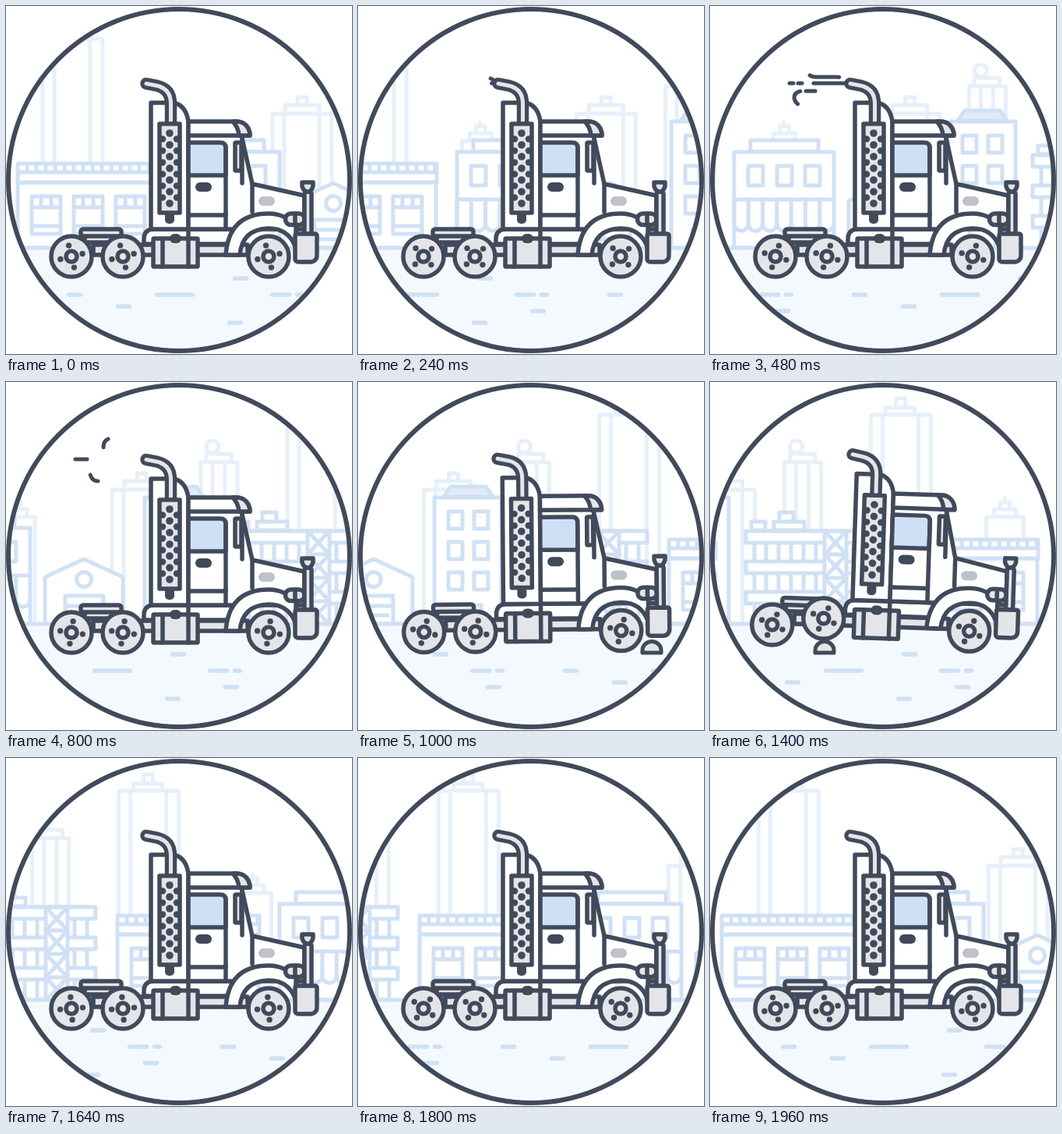
Recreate the animation shown at these times as an HTML page with a canvas. Size 444 by 446 pixels, loop 2 s.

```html
<!DOCTYPE html>
<html lang="en">
<head>
<meta charset="utf-8">
<title>Truck on the road</title>
<style>
html, body { margin: 0; width: 100%; height: 100%; overflow: hidden; background: #fff; }
canvas { display: block; width: 444px; height: 446px; }
</style>
</head>
<body>
<canvas id="stage" width="444" height="446"></canvas>
<script>
const c = document.getElementById('stage').getContext('2d');
const INK = '#414a5b', GRAY = '#e4e5e9', GLASS = '#cee0f5', MID = '#d0e1f5', FAR = '#e7f0fa', GROUND = '#f4f9fd';
const TAU = Math.PI * 2, STEP = 40, FRAMES = 50;

function pen(color, width) {
  c.strokeStyle = color;
  c.lineWidth = width;
  c.lineCap = c.lineJoin = 'round';
}
function shape(d, fill) {
  const p = new Path2D(d);
  if (fill) { c.fillStyle = fill; c.fill(p); }
  c.stroke(p);
}
function box(x1, y1, x2, y2, fill, r = 0) {
  c.beginPath();
  c.roundRect(x1, y1, x2 - x1, y2 - y1, r);
  if (fill) { c.fillStyle = fill; c.fill(); }
  c.stroke();
}
function solid(x1, y1, x2, y2, color, r = 0) {
  c.fillStyle = color;
  c.beginPath();
  c.roundRect(x1, y1, x2 - x1, y2 - y1, r);
  c.fill();
}
function line(x1, y1, x2, y2) {
  c.beginPath();
  c.moveTo(x1, y1);
  c.lineTo(x2, y2);
  c.stroke();
}
function disc(x, y, r, fill, edge) {
  c.beginPath();
  c.arc(x, y, r, 0, TAU);
  if (fill) { c.fillStyle = fill; c.fill(); }
  if (edge) c.stroke();
}
function at(x, draw) {
  c.save();
  c.translate(x, 0);
  draw();
  c.restore();
}
// Piecewise curve through [time, value] points
function curve(t, pts, smooth) {
  if (t <= pts[0][0]) return pts[0][1];
  for (let i = 1; i < pts.length; i++) {
    const [t0, a] = pts[i - 1], [t1, b] = pts[i];
    if (t <= t1) {
      let k = (t - t0) / (t1 - t0);
      if (smooth) k = k * k * (3 - 2 * k);
      return a + (b - a) * k;
    }
  }
  return pts[pts.length - 1][1];
}

// Distant skyline
function farCity() {
  pen(FAR, 5);
  box(79, 21, 91, 33, '#fff');
  box(66, 33, 103, 42, '#fff');
  box(47, 42, 124, 310, '#fff');
  line(62, 42, 62, 310);
  line(108, 42, 108, 310);

  line(219, 149, 219, 154);
  box(213, 154, 225, 164, '#fff');
  box(205, 163, 233, 173, '#fff');
  box(195, 173, 243, 310, '#fff');

  box(374, 117, 386, 127, '#fff');
  box(358, 127, 402, 138, '#fff');
  box(342, 138, 418, 310, '#fff');
  line(357, 138, 357, 310);
  line(402, 138, 402, 310);

  disc(471, 83, 8, '#fff', true);
  box(463, 92, 495, 103, '#fff');
  box(456, 103, 503, 310, '#fff');
  line(471, 103, 471, 310);
  line(487, 103, 487, 310);
}

function warehouse() {
  box(15, 226, 196, 310, '#fff');
  box(15, 202, 197, 226, '#fff');
  line(15, 213, 197, 213);
  for (let x = 27; x < 196; x += 12) line(x, 204, x, 211);
  for (const x of [33, 87, 141]) {
    box(x, 244, x + 37, 292);
    line(x, 258, x + 37, 258);
    line(x + 12, 244, x + 12, 258);
    line(x + 25, 244, x + 25, 258);
    line(x, 282, x + 37, 282);
  }
}
function store() {
  box(244, 172, 331, 187, '#fff');
  box(223, 187, 351, 310, '#fff');
  for (const x of [241, 278, 314]) box(x, 205, x + 19, 230);
  line(223, 248, 351, 248);
  const w = 128 / 7;
  for (let i = 0; i < 7; i++) {
    const x = 223 + i * w;
    line(x, 248, x, 280);
    c.beginPath();
    c.arc(x + w / 2, 279, w / 2, Math.PI, 0, true);
    c.stroke();
  }
}
function house() {
  shape('M370 310V250L420 227L470 250V310Z', '#fff');
  disc(420, 253, 9.5, '#fff', true);
  box(396, 274, 445, 310);
  line(396, 287, 445, 287);
  line(402, 299, 438, 299);
}
function flats() {
  shape('M510 147L519 134H564L573 147Z', '#e1ebf7');
  box(498, 148, 584, 310, '#fff');
  for (let y = 166; y < 260; y += 39)
    for (const x of [516, 549]) box(x, y, x + 18, y + 22);
  box(525, 286, 558, 310);
}
function terrace() {
  box(613, 179, 631, 190, '#fff');
  box(642, 179, 681, 190, '#fff');
  box(649, 167, 667, 179, '#fff');
  box(617, 191, 760, 310, '#fff');
  for (let x = 632; x < 760; x += 16) line(x, 191, x, 310);
  for (let y = 191; y < 290; y += 39) box(606, y, 771, y + 15, '#fff');
  box(707, 191, 735, 310, '#fff');
  for (let y = 191; y < 300; y += 30) {
    line(707, y, 735, y);
    line(707, y, 735, y + 30);
    line(735, y, 707, y + 30);
  }
}
function midCity() {
  pen(MID, 5);
  warehouse();
  store();
  house();
  flats();
  terrace();
}

// Offsets are relative to the long dash
const DASHES = [
  [0, 46, 370], [100, 15, 349], [148, 22, 370], [180, 7, 370],
  [267, 15, 370], [-50, 15, 385], [168, 15, 391], [93, 15, 406]
];
function road(n) {
  pen(MID, 5.5);
  const start = 193.5 - 23 * n;
  for (let k = -1; k < 5; k++)
    for (const [x, w, y] of DASHES) {
      const left = start + k * 380 + x;
      if (left > -60 && left < 450) line(left, y, left + w, y);
    }
}

function streak(d, a, b) {
  if (b <= a) return;
  c.setLineDash([b - a, 999]);
  c.lineDashOffset = -a;
  shape(d);
  c.setLineDash([]);
}
function smoke(n) {
  if (n < 5 || n > 24) return;
  pen(INK, 5);
  const mid = 'M178 99H88';
  streak(mid, curve(n, [[12, 0], [20, 74], [24, 90]]), curve(n, [[5, 0], [12, 45], [20, 89], [24, 90]]));
  if (n > 9) for (const s of [60, 71]) {
    const a = s + (n - 12) * 9;
    if (n < 16) streak(mid, a, Math.min(a + 5, 90));
  }
  streak('M176 97Q170 91 162 91H136Q126 91 125 83Q125 76 131 73',
    curve(n, [[9, 0], [12, 12], [20, 56], [24, 73]]), curve(n, [[5, 0], [12, 50], [17, 73]]));
  const low = 'M150 109H118Q108 110 108 118Q110 127 118 127';
  streak(low, curve(n, [[8, 0], [12, 15], [16, 32]]), curve(n, [[6, 0], [12, 27], [15, 32]]));
  streak(low, curve(n, [[10, 30], [12, 34], [20, 48], [24, 62]]), curve(n, [[10, 30], [12, 56], [15, 62]]));
}

function rock(x) {
  pen(INK, 5);
  shape(`M${x - 12} 347V344A12 11.5 0 0 1 ${x + 12} 344V347Z`, GRAY);
}

function wheel(x, y, turn) {
  pen(INK, 5.5);
  disc(x, y, 26, GRAY, true);
  disc(x, y, 7, GRAY, true);
  for (let i = 0; i < 4; i++) {
    const a = turn + i * TAU / 4;
    disc(x + 14.5 * Math.sin(a), y - 14.5 * Math.cos(a), 3.7, INK);
  }
}

function exhaust() {
  const d = 'M180 99.5L193 102Q211.5 106 211.5 125V152';
  pen(INK, 15.5);
  shape(d);
  pen(GRAY, 5);
  shape(d);
  pen(INK, 5.5);
  solid(204, 264, 216, 279, INK, 5);
  box(197, 151, 223, 265, GRAY);
  for (let i = 0; i < 7; i++) {
    const y = 163 + i * 15;
    disc(210, y, 4.8, INK);
    if (i < 6) {
      disc(201, y + 7.5, 4.2, INK);
      disc(219, y + 7.5, 4.2, INK);
    }
  }
}

function body() {
  pen(INK, 5.5);
  // chassis and deck
  box(112, 306, 310, 319, GRAY);
  box(101, 294, 146, 303, GRAY, 3);
  box(96, 286, 148, 295, GRAY, 3);
  shape('M177 305V297Q178 287 188 286H300V305Z', '#fff');
  // sleeper and cab
  shape('M186 286V124H216Q231 128 234 148V286Z', '#fff');
  shape('M234 286V165H302L316 228L383 243V286Z', '#fff');
  shape('M234 217V175H275Q282 175 282 182V217Z', GLASS);
  line(282, 180, 282, 284);
  line(234, 268, 282, 268);
  solid(243, 226, 264, 238, INK, 6);
  shape('M234 148H296C307 148 313 157 313 166H234Z', '#fff');
  shape('M291 148H296C307 148 313 157 313 166H299Q298 155 291 148Z', GRAY);
  line(303, 168, 303, 227);
  box(294, 175, 302, 211, GRAY, 1);
  line(316, 228, 316, 264);
  solid(324, 244, 345, 256, '#bdc1c9', 6);
  // front fender
  shape('M282 319Q286 266 337 266Q358 266 372 282V308H371Q362 285 337 285Q303 286 300 319Z', '#fff');
  box(358.5, 266, 383, 280.5, GRAY, 7);
  line(371, 266, 371, 280);
  box(383, 238, 392, 292, GRAY, 3);
  shape('M380 226H394V231Q392 238 387 238Q382 238 380 231Z', GRAY);
  box(371, 292, 399, 328, GRAY, [2, 2, 8, 4]);
  // fuel tank
  box(189, 298, 246, 334, GRAY, 1);
  line(201, 298, 201, 334);
  line(234, 286, 234, 334);
  solid(210, 292, 225, 304, INK, 6);
  exhaust();
}

function truck(n, rockX) {
  const dx = curve(n, [[30, 0], [35, -1], [40, 0]], true);
  const dy = curve(n, [[24, 0], [27, -6], [29, -6.5], [32, -2], [35, -5.4], [38, -4.5], [41, 0]], true);
  const tilt = curve(n, [[24, 0], [27, -.03], [29, -.022], [32, 0], [35, .033], [38, .027], [41, 0]], true);
  c.save();
  c.translate(222 + dx, 222 + dy);
  c.rotate(tilt);
  c.translate(-222, -222);
  body();
  c.restore();

  const turn = -.24 + n * TAU * 7.5 / 49;
  for (const wx of [84, 150, 337]) {
    const x = 222 + dx + (wx - 222) * Math.cos(tilt) - 99 * Math.sin(tilt);
    let y = 222 + dy + (wx - 222) * Math.sin(tilt) + 99 * Math.cos(tilt);
    const gap = Math.abs(x - rockX);
    if (gap < 35) y = Math.min(y, 347 - Math.sqrt(44 * 44 - gap * gap));
    wheel(x, y, turn);
  }
}

function render(n) {
  c.fillStyle = '#fff';
  c.fillRect(0, 0, 444, 446);
  c.save();
  c.beginPath();
  c.arc(222, 223, 219, 0, TAU);
  c.clip();
  for (let k = 0; k < 3; k++) at(k * 520 - 10.3 * n, farCity);
  for (let k = 0; k < 2; k++) at(k * 784 - 16 * n, midCity);
  c.fillStyle = GROUND;
  c.fillRect(0, 310, 444, 136);
  pen(MID, 5);
  line(0, 310, 444, 310);
  road(n);
  const rockX = 285 - 23 * (n - 29);
  if (n > 20 && n < 42) rock(rockX);
  smoke(n);
  truck(n, rockX);
  c.restore();
  pen(INK, 6);
  disc(222, 223, 219, null, true);
}

const begin = performance.now();
function tick(now) {
  render(Math.floor(Math.max(0, now - begin) / STEP) % FRAMES);
  requestAnimationFrame(tick);
}
render(0);
requestAnimationFrame(tick);
</script>
</body>
</html>
```
